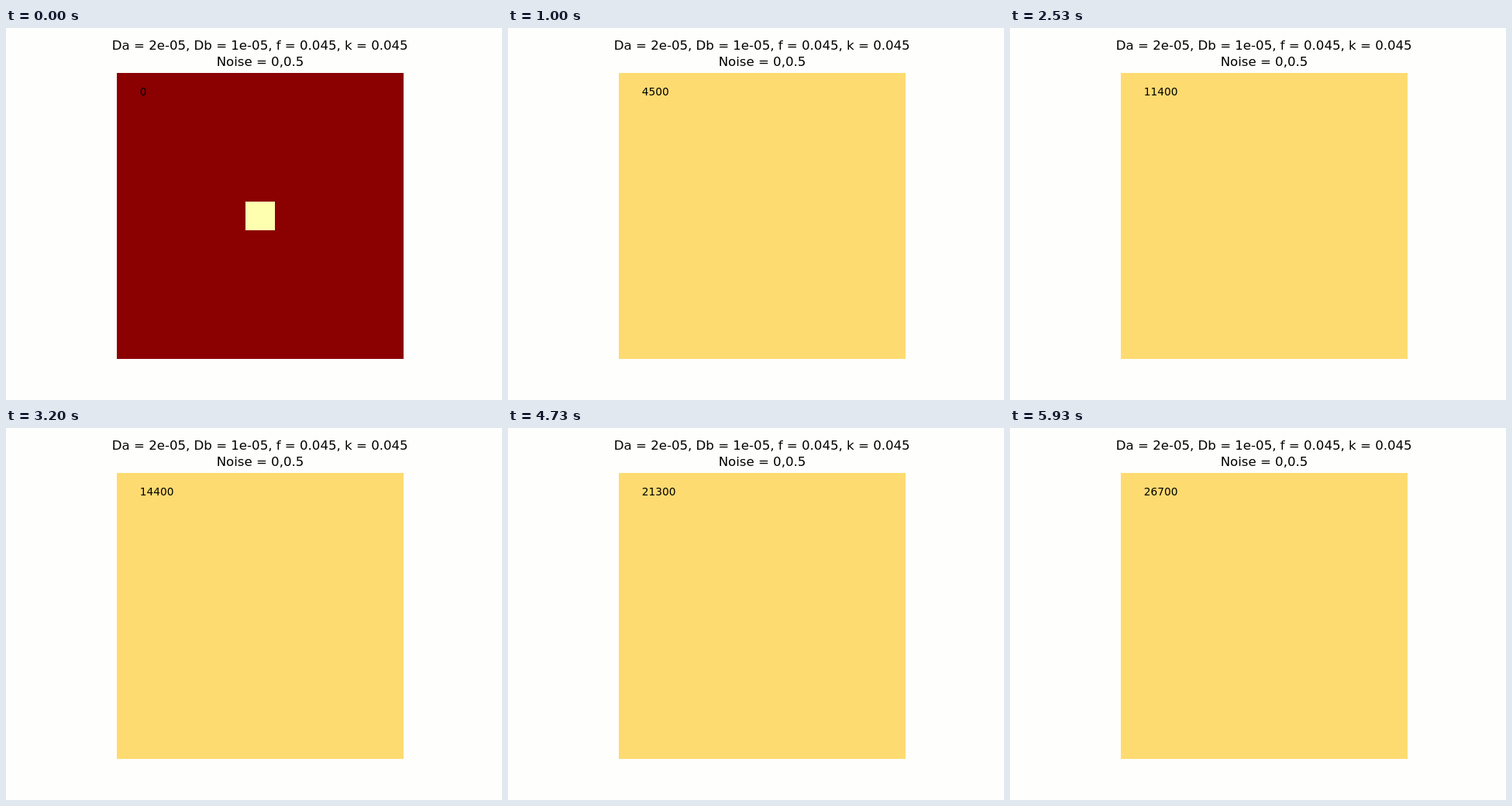
An HTML page with a canvas for the animation above (6 s loop, 640x480 px).

```html
<!DOCTYPE html>
<html lang="en">
<head>
<meta charset="utf-8">
<title>Reaction-diffusion</title>
<style>
  html, body { margin: 0; width: 100%; height: 100%; overflow: hidden; background: #fefefc; }
  canvas { position: absolute; left: 143px; top: 58px; width: 370px; height: 369px; image-rendering: pixelated; }
  svg { position: absolute; left: 0; top: 0; }
  text { font-family: "DejaVu Sans", sans-serif; fill: #000; }
  .title { font-size: 16.6px; text-anchor: middle; }
  .count { font-size: 13.72px; }
</style>
</head>
<body>
<canvas id="field" width="256" height="256"></canvas>
<svg width="640" height="480" viewBox="0 0 640 480">
  <text class="title" x="327.7" y="28">Da = 2e-05, Db = 1e-05, f = 0.045, k = 0.045</text>
  <text class="title" x="328" y="49">Noise = 0,0.5</text>
  <text class="count" id="count" x="172.8" y="87">0</text>
</svg>
<script>
const LOOP = 6000, FRAMES = 90, STEPS = 300, SETTLED = 15;
const SIZE = 256, HALF = SIZE / 2, SEED = 13;
const DX = 2.5 / SIZE, DA = 2e-5 / DX ** 2, DB = 1e-5 / DX ** 2, F = 0.045, K = 0.045;

// The field is symmetric, so one quadrant with a mirrored border is enough.
const W = HALF + 2;
let a = new Float64Array(W * W).fill(1), b = new Float64Array(W * W);
let a2 = a.slice(), b2 = b.slice();
for (let y = 1; y <= SEED; y++) {
  for (let x = 1; x <= SEED; x++) {
    a[y * W + x] = 0;
    b[y * W + x] = 0.5;
  }
}

function mirror(g) {
  for (let i = 1; i <= HALF; i++) {
    g[i] = g[W + i];
    g[(HALF + 1) * W + i] = g[HALF * W + i];
    g[i * W] = g[i * W + 1];
    g[i * W + HALF + 1] = g[i * W + HALF];
  }
}

function step() {
  mirror(a);
  mirror(b);
  for (let y = 1; y <= HALF; y++) {
    for (let i = y * W + 1, end = i + HALF; i < end; i++) {
      const u = a[i], v = b[i], r = u * v * v;
      const lapU = a[i - 1] + a[i + 1] + a[i - W] + a[i + W] - 4 * u;
      const lapV = b[i - 1] + b[i + 1] + b[i - W] + b[i + W] - 4 * v;
      a2[i] = u + DA * lapU - r + F * (1 - u);
      b2[i] = v + DB * lapV + r - (F + K) * v;
    }
  }
  [a, a2] = [a2, a];
  [b, b2] = [b2, b];
}

const shots = [a.slice()];
function shot(n) {
  while (shots.length <= n) {
    for (let s = 0; s < STEPS; s++) step();
    shots.push(a.slice());
  }
  return shots[n];
}

const STOPS = [
  [255, 255, 176], [255, 237, 150], [254, 217, 108], [254, 178, 76], [253, 141, 60],
  [252, 78, 42], [227, 26, 28], [186, 0, 20], [139, 0, 0]
];
const PALETTE = Array.from({ length: 256 }, (_, i) => {
  const p = i / 255 * 8, n = Math.min(7, Math.floor(p));
  return STOPS[n].map((c, j) => Math.round(c + (STOPS[n + 1][j] - c) * (p - n)));
});

const ctx = document.getElementById("field").getContext("2d");
const image = ctx.createImageData(SIZE, SIZE);
const label = document.getElementById("count");
const fold = p => (p < HALF ? HALF - p : p - HALF + 1);

function paint(grid) {
  let o = 0;
  for (let y = 0; y < SIZE; y++) {
    const row = fold(y) * W;
    for (let x = 0; x < SIZE; x++) {
      const level = Math.max(0, Math.min(255, Math.round(grid[row + fold(x)] * 255)));
      const c = PALETTE[level];
      image.data[o++] = c[0];
      image.data[o++] = c[1];
      image.data[o++] = c[2];
      image.data[o++] = 255;
    }
  }
  ctx.putImageData(image, 0, 0);
}

// Frame starts are rounded to hundredths of a second.
const startOf = n => Math.round(n * 20 / 3) * 10;
function frameAt(t) {
  let n = Math.min(FRAMES - 1, Math.floor(t * FRAMES / LOOP) + 1);
  while (n > 0 && startOf(n) > t) n--;
  return n;
}

let shown = -1;
function draw(t) {
  const n = frameAt(t % LOOP);
  if (n === shown) return;
  shown = n;
  label.textContent = n * STEPS;
  paint(shot(Math.min(n, SETTLED)));
}

const begin = performance.now();
function tick() {
  draw(performance.now() - begin);
  requestAnimationFrame(tick);
}
tick();
</script>
</body>
</html>
```
